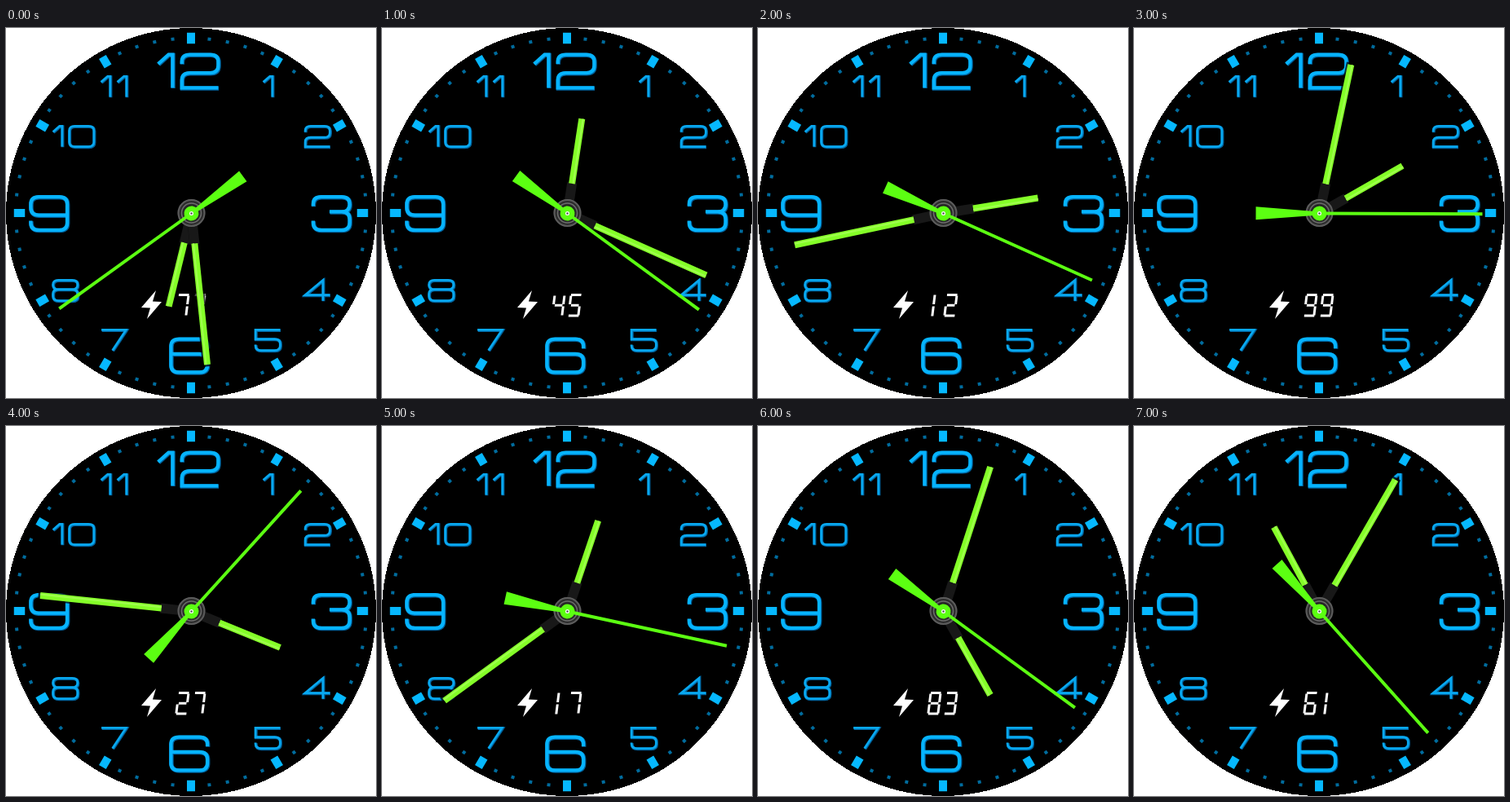
Animation of 454x454 px, one loop 8000 ms. Source, as an HTML page:

```html
<!DOCTYPE html>
<html lang="en">
<head>
<meta charset="utf-8">
<title>Watch face</title>
<style>
  html, body { margin: 0; width: 100%; height: 100%; overflow: hidden; background: #fff; }
  svg { display: block; width: 454px; height: 454px; }
  .line { fill: none; vector-effect: non-scaling-stroke; }
</style>
</head>
<body>
<svg viewBox="0 0 454 454">
  <circle cx="227" cy="227" r="227" shape-rendering="crispEdges"/>
  <g id="ticks"></g>
  <g id="numerals"></g>
  <path d="M184 322L166 343L177 343.500L173 357L191 336L180 335.500Z" fill="#fff"/>
  <g id="digits" fill="none" stroke="#fff" stroke-width="3"></g>
  <g id="hour"></g>
  <g id="minute"></g>
  <g transform="translate(227.500 227)" fill="none">
    <circle r="17" fill="#2c2c2c"/>
    <circle r="16" stroke="#5c5c5c" stroke-width="2"/>
    <circle r="12" stroke="#6c6c6c" stroke-width="1.500"/>
    <circle r="10" fill="#222"/>
  </g>
  <g id="second" fill="#5cff12">
    <path d="M-2 0V-200H2V0L8 78H-8Z"/>
    <circle r="9"/>
  </g>
  <circle cx="227.500" cy="227.500" r="2.500" fill="#fff"/>
  <circle cx="227.500" cy="227.500" r="1.200" fill="#555"/>
</svg>
<script>
const $ = id => document.getElementById(id);
const C = 227;

// Corners of each numeral as column and row of a grid; "!" keeps a corner sharp
const grid = [0, 28, 45, 55, 72, 100];
const corners = [
  '20 50 55 05 00 20', '01 40! 50! 55', '01 00 50 53 03 05! 55',
  '01 00 50 52 22|22 52 55 05 04', '45 40! 04! 54', '50 00! 02! 52 55 05 04',
  '51 50 00 05 55 52 02', '00 50! 25', '20 50 52 02 00 20|22 52 55 05 02 22',
  '04 05 55 50 00 03 53'
];

function toward(p, q, d = 22) {
  const k = d / Math.hypot(q.x - p.x, q.y - p.y);
  return `${p.x + (q.x - p.x) * k} ${p.y + (q.y - p.y) * k}`;
}

function outline(run) {
  const pts = run.split(' ').map(([c, r, sharp]) => ({ x: grid[c], y: grid[r], sharp }));
  return pts.map((p, i) => {
    const at = `${p.x} ${p.y}`, prev = pts[i - 1], next = pts[i + 1];
    if (!prev) return 'M' + at;
    if (!next || p.sharp) return 'L' + at;
    return `L${toward(p, prev)}Q${at} ${toward(p, next)}`;
  }).join('');
}
const glyphs = corners.map(c => c.split('|').map(outline).join(''));

// lean: share of the width left of the anchor; left: smallest x
const big = { r: 174.5, w: 50, h: 46, one: 23, gap: 6, t: 5.3, lean: 0.54, left: 28, color: '#06b4ff' };
const small = { r: 182, w: 34, h: 29, one: 15, gap: 5, t: 3.8, lean: 0.5, left: 56, color: '#08a8f0' };

function numeral(hour) {
  const s = hour % 3 ? small : big;
  const text = [...String(hour)];
  const width = d => d === '1' ? s.one : s.w;
  const total = text.reduce((sum, d) => sum + width(d) + s.gap, -s.gap);
  const turn = hour * Math.PI / 6;
  const a = turn + 0.026 * Math.sin(4 * turn);
  let x = Math.max(s.left, C + s.r * Math.sin(a) - total * s.lean);
  const y = C + 0.8 - s.r * Math.cos(a) - s.h / 2;
  return text.map(d => {
    const w = width(d);
    const stroke = (shift, color, t) =>
      `<path class="line" d="${glyphs[d]}" stroke="${color}" stroke-width="${t}"
        transform="translate(${x + s.t / 2 + shift} ${y + s.t / 2 + shift})
        scale(${(w - s.t) / 100} ${(s.h - s.t) / 100})"/>`;
    const path = stroke(0.4, '#00629c', s.t) + stroke(-0.3, s.color, s.t - 1);
    x += w + s.gap;
    return path;
  }).join('');
}
$('numerals').innerHTML = Array.from({ length: 12 }, (_, i) => numeral(i + 1)).join('');

$('ticks').innerHTML = Array.from({ length: 60 }, (_, i) => {
  const a = i * Math.PI / 30, hour = i % 5 === 0;
  const x = C + (hour ? 210.5 : 215) * Math.sin(a), y = C - 214.5 * Math.cos(a);
  const [w, h, color] = hour ? [10, 13.5, '#06b8ff'] : [4, 4, '#006c9e'];
  return `<rect x="${-w / 2}" y="${-h / 2}" width="${w}" height="${h}" fill="${color}"
    transform="translate(${x} ${y}) rotate(${i * 6})"/>`;
}).join('');

// Hand pointing up, with a dark collar near the hub
const hand = len => `
  <path d="M-6 -10V${-len - 2.5}H6V-10Z" opacity=".75"/>
  <path d="M-6 -13V-38H6V-13Z" fill="#181818"/>
  <path d="M-4 -37V${-len}H4V-37Z" fill="#84ff28"/>
  <path d="M1.500 -37V${-len}" stroke="#a0ff50" stroke-width="2"/>`;
$('hour').innerHTML = hand(117.5);
$('minute').innerHTML = hand(186.5);

// Seven-segment digits; m is the centred bar of the 1
const segs = {
  a: 'M0 0H12.5', b: 'M12 1V11.500', c: 'M12 14V25', d: 'M0 25.500H12.5',
  e: 'M0 14V25', f: 'M0 1V11.500', g: 'M1.500 12.700H11', m: 'M5 0V11.500M5 14V26'
};
const lit = 'abcdef m abged abgcd fgbc afgcd afgecd abc abcdefg abcdfg'.split(' ');
const digit = (n, i) =>
  `<path d="${[...lit[n]].map(s => segs[s]).join('')}" transform="translate(${212 + i * 20} 327.500) skewX(-7)"/>`;

// Time shown and battery charge, one reading per second
const readings = [
  '6:29:39 77', '12:19:21 45', '2:43:19 12', '2:02:15 99',
  '3:46:07 27', '12:39:17 17', '5:03:21 83', '11:05:23 61'
];
const turn = (id, deg) =>
  $(id).setAttribute('transform', `translate(227.500 227.500) rotate(${deg})`);

let shown = '';
function draw(now) {
  const reading = readings[Math.floor(now / 1000) % readings.length];
  if (reading === shown) return;
  shown = reading;
  const [time, battery] = reading.split(' ');
  const [h, m, s] = time.split(':').map(Number);
  turn('hour', h * 30 + m / 2 - 0.8);
  turn('minute', m * 6);
  turn('second', s * 6 + 0.2);
  $('digits').innerHTML = [...battery].map(digit).join('');
}

const start = performance.now();
function tick() {
  draw(performance.now() - start);
  requestAnimationFrame(tick);
}
tick();
</script>
</body>
</html>
```
